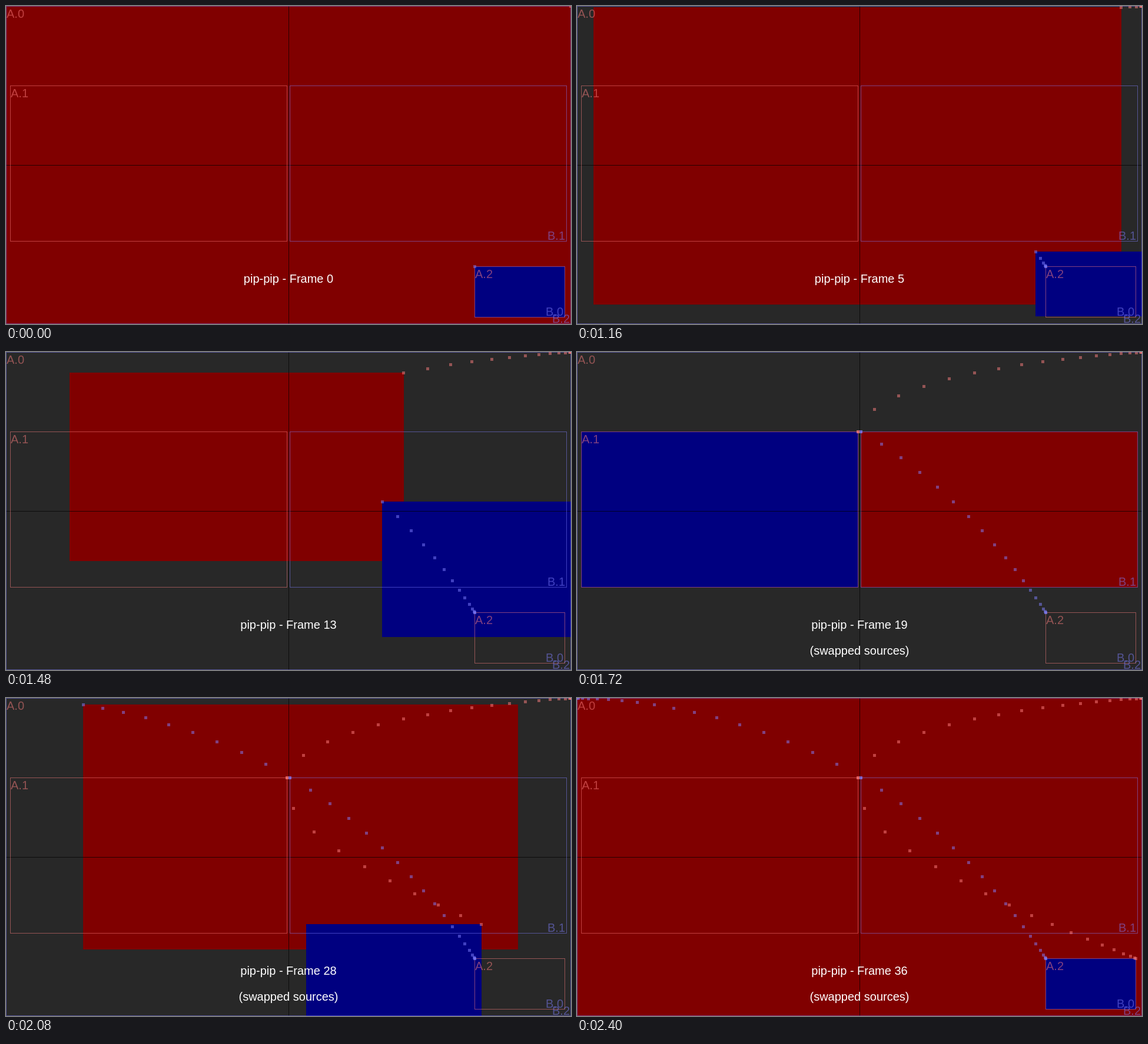
An HTML page that plays this animation: 960 by 540 pixels, repeating every 3.4 s.

```html
<!DOCTYPE html>
<html lang="en">
<head>
<meta charset="utf-8">
<title>pip-pip</title>
<style>
  html, body { margin: 0; width: 100%; height: 100%; overflow: hidden; background: #282828; }
  svg { display: block; width: 960px; height: 540px; }
  rect { shape-rendering: crispEdges; }
  text { font: 20px "Liberation Sans", Arial, sans-serif; }
  .a { --c: #ff8080; }
  .b { --c: #8080ff; }
  .box { fill: none; stroke: var(--c); stroke-opacity: .5; }
  .dot, .tag { fill: var(--c); fill-opacity: .5; }
  .cross { fill: #000; fill-opacity: .7; }
  .title { fill: #fff; text-anchor: middle; }
</style>
</head>
<body>
<svg id="stage" viewBox="0 0 960 540"></svg>
<script>
const NS = "http://www.w3.org/2000/svg";
const stage = document.getElementById("stage");
const LAST = 36, SWAP = 19, STEPS = 17;
const HOLD = 1000, STEP = 40, LOOP = 3400;

function make(name, attrs, text) {
  const el = document.createElementNS(NS, name);
  set(el, attrs);
  if (text) el.textContent = text;
  return el;
}
function add(name, attrs, text) {
  return stage.appendChild(make(name, attrs, text));
}
function set(el, attrs) {
  for (const key in attrs) el.setAttribute(key, attrs[key]);
}

// Each channel steers one upper corner along two curves, through three sizes.
const channels = {
  a: {
    right: true,
    widths: [960, 470.4, 153.6],
    paths: [
      "M959 0C865 6 771 16 676 35C586 53 485.5 87.7 477 135",
      "M477 135C466 196 542 246 607 285C721 351 836 397 949 442"
    ]
  },
  b: {
    right: false,
    widths: [153.6, 470.4, 960],
    paths: [
      "M796 442C723.5 331 613 210 482 135",
      "M482 135C332 46.5 160 3 0 0"
    ]
  }
};

for (const ch of Object.values(channels)) {
  ch.curves = ch.paths.map(d => {
    const path = make("path", { d });
    return { path, length: path.getTotalLength() };
  });
}

// The corner speeds up to the middle of the move, then slows down;
// the size eases in and out within each half.
function pose(ch, n) {
  const half = n < SWAP ? 0 : 1;
  const t = Math.max(0, n - (half ? SWAP : 1)) / STEPS;
  const along = half ? Math.sin(t * Math.PI / 2) : 1 - Math.cos(t * Math.PI / 2);
  const ease = (1 - Math.cos(t * Math.PI)) / 2;
  const { path, length } = ch.curves[half];
  const p = path.getPointAtLength(length * along);
  const x = Math.round(p.x), y = Math.round(p.y);
  const from = ch.widths[half], to = ch.widths[half + 1];
  const height = Math.ceil((from + (to - from) * ease) * 9 / 16 - 1e-6);
  const width = Math.floor(height * 16 / 9 + 1e-6);
  return { dot: { x, y }, rect: { x: ch.right ? x + 1 - width : x, y, width, height } };
}

for (const ch of Object.values(channels)) {
  ch.poses = Array.from({ length: LAST + 1 }, (_, n) => pose(ch, n));
}

const red = add("rect", { fill: "#800000" });
const blue = add("rect", { fill: "#000080" });
add("rect", { class: "cross", x: 480, y: 0, width: 1, height: 540 });
add("rect", { class: "cross", x: 0, y: 270, width: 960, height: 1 });

const boxes = [
  ["a", 7, 135, 471, 265],
  ["a", 796, 442, 154, 87],
  ["b", 482, 135, 471, 265],
  ["b", 0, 0, 960, 540]
];
for (const [c, x, y, w, h] of boxes) {
  add("rect", { class: "box " + c, x: x + .5, y: y + .5, width: w - 1, height: h - 1 });
}

const tags = [
  ["a", "A.0", 1, 20], ["a", "A.1", 8, 155], ["a", "A.2", 797, 462],
  ["b", "B.0", 917, 526], ["b", "B.1", 920, 397], ["b", "B.2", 928, 538]
];
for (const [c, label, x, y] of tags) add("text", { class: "tag " + c, x, y }, label);

for (const [c, ch] of Object.entries(channels)) {
  ch.dots = ch.poses.map(({ dot }) =>
    add("rect", { class: "dot " + c, x: dot.x - 2, y: dot.y - 2, width: 5, height: 5 }));
}

const title = add("text", { class: "title", x: 480, y: 470 });
const note = add("text", { class: "title", x: 480, y: 514 }, "(swapped sources)");

let shown = -1;
function show(n) {
  if (n === shown) return;
  shown = n;
  const { a, b } = channels;
  const swapped = n >= SWAP;
  set(red, (swapped ? b : a).poses[n].rect);
  set(blue, (swapped ? a : b).poses[n].rect);
  for (const ch of [a, b]) {
    ch.dots.forEach((dot, i) => set(dot, { visibility: i <= n ? "visible" : "hidden" }));
  }
  title.textContent = "pip-pip - Frame " + n;
  set(note, { visibility: swapped ? "visible" : "hidden" });
}

const start = performance.now();
function tick() {
  const t = (performance.now() - start) % LOOP;
  show(t < HOLD ? 0 : Math.min(LAST, 1 + Math.floor((t - HOLD) / STEP)));
  requestAnimationFrame(tick);
}
tick();
</script>
</body>
</html>
```
